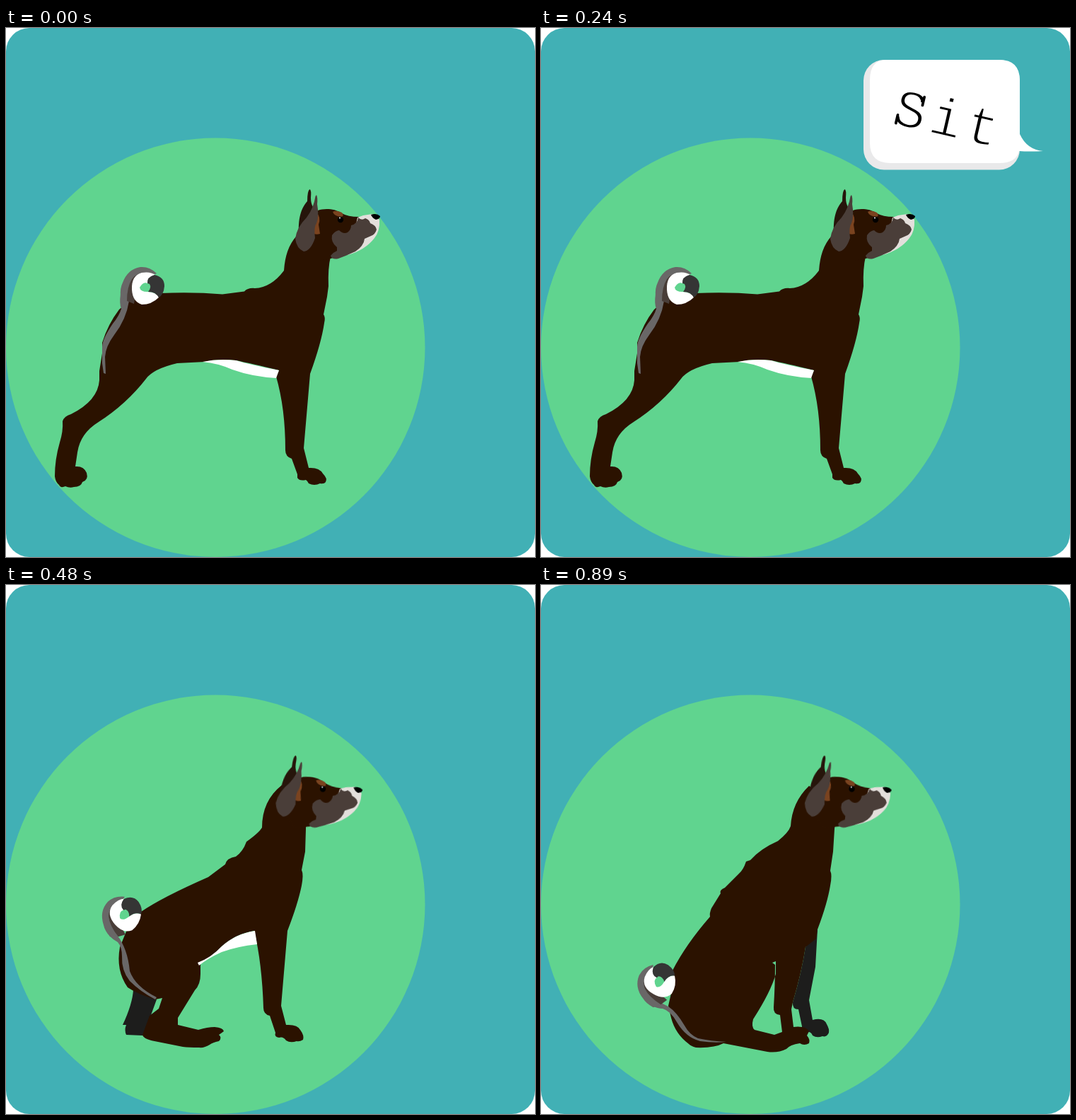
Write an HTML page that moves like this. It is 748 px wide and 748 px high and loops after 1080 ms.

```html
<!DOCTYPE html>
<html lang="en">
<head>
<meta charset="utf-8">
<title>Sit</title>
<style>
  html, body { margin: 0; width: 100%; height: 100%; overflow: hidden; background: #fff; }
  svg { display: block; width: 100%; height: 100%; }
  .coat { fill: #2b1200; fill-rule: evenodd; }
  .far { fill: #1d1d1c; }
  .tail { fill: #696767; }
  .gap { fill: #493d38; }
  .muzzle { fill: #4a3e39; }
  .tan { fill: #7a431f; }
  .white { fill: #fff; }
  .say { font: 76px "Liberation Mono", "Courier New", monospace; letter-spacing: 6.5px; stroke: #fff; stroke-width: 2.4px; }
</style>
</head>
<body>
<svg viewBox="0 0 748 748">
  <defs>
    <g id="head">
      <path fill="#26150b" d="M414 290C413 265 419 253 426 245Q426 230 429.500 228Q432 229 431 240Q431 248 434 253L420 285Z"/>
      <path class="coat" d="M411 300L425 270L441 258C450 255 464 255 475 262Q483 267 499 267L505 285L480 310L466 324L459 326L440 330Z"/>
      <path fill="#e3dfdb" d="M497 268L505 265L518 263L528 271Q529 287 521 297Q508 314 483 321L490 300Z"/>
      <path class="muzzle" d="M498 268Q503 273 508 269Q514 271 515 276Q523 279 524 285Q522 292 516 294L507 298Q506 308 494 316Q481 322 470 326Q461 328 459 322Q463 317 468 315L468 310Q459 303 461 293Q465 287 471 286Q477 292 483 289Q488 285 488 279Q497 277 498 268Z"/>
      <path d="M516 264Q524 261 529 266Q529 270 523 271Q518 269 516 264Z"/>
      <path class="tan" d="M438 260Q446 267 442 278L444 291Q438 293 433 290Z"/>
      <path class="muzzle" d="M439 236Q441 240 440 249Q443 266 439 276Q435 281 437 297Q431 315 421 316Q411 312 409 298Q411 282 425 268Q435 255 437.500 238Z"/>
      <path class="tan" d="M462 260Q467 257 475 261Q479 266 474 267Q464 266 462 260Z"/>
      <circle cx="473" cy="271" r="4.2"/>
      <circle class="white" cx="472" cy="268.5" r="1"/>
    </g>
    <g id="curl">
      <path class="gap" d="M171 386Q169 362 181 349Q195 341 211 348L188 350L181 390Z"/>
      <path class="tail" d="M213 347Q203 337 190 338Q172 341 165 360Q161 368 162 379L171 386Q171 366 178 355Q188 342 211 348Z"/>
      <path class="white" d="M178 370Q177 350 192 346Q204 344 211 349Q201 352 200 361Q194 358 189 367Q190 373 200 373Q212 373 216 381Q206 391 192 391Q179 387 178 370Z"/>
      <path fill="#353535" d="M210 349Q224 352 224 365Q223 377 216 381Q212 373 201 373Q206 367 203 362L200 361Q199 352 210 349Z"/>
    </g>
  </defs>
  <rect width="748" height="748" rx="33" fill="#41b0b5"/>
  <circle cx="296.25" cy="451.75" r="296.25" fill="#60d48f"/>
  <g id="dog"></g>
  <g id="bubble">
    <rect x="456" y="45" width="221" height="155.500" rx="29" fill="#e9e9ea"/>
    <path class="white" d="M488 45H648Q677 45 677 74V150Q687 172 710 174Q690 175 676 174Q672 191 648 191H494Q465 191 465 162V74Q465 45 488 45Z"/>
    <g transform="translate(495 135) rotate(13)">
      <text class="say">Sit</text>
      <path d="M37.500 -47V-35M6.500 -14V-2" stroke="#000" stroke-width="3.8" stroke-linecap="round"/>
    </g>
  </g>
</svg>
<script>
const LOOP = 1080;

// head and curl: [x, y, turn]
const poses = [
  {
    span: [0, 360], head: [430, 228, 0], curl: [201, 368.5, 0],
    coat: `M218 375Q265 373 306 376.500L337 372.500Q342 367 352 368Q375 367 393 343Q395 312 410 295L430 290L459 323
      Q455 340 456 365L454 380L449 405Q452 409 450 417Q446 445 430 489L421 594L428 622Q443 621 448 630
      Q455 637 452 642Q450 645 444 644Q436 648 428 644Q426 640 424 639Q415 641 412 636L412 631L404 609
      Q395 606 395 597Q395 538 382 493L386 484Q345 474 325 470Q300 467 281 472L242 474Q208 482 198 496
      Q170 532 131 557Q105 573 101 600L98 620Q110 619 114 629Q117 639 108 642Q106 649 96 649Q90 651 84 648
      Q77 651 75 646Q70 642 69 634Q69 610 76 586Q81 570 80 556Q82 549 92 546Q130 527 132 498L132 485
      L136 460L136 445Q144 419 160 398L175 385Z`,
    belly: 'M278 472Q300 467 325 470Q345 476 386 484L382 495Q348 493 320 483Q300 474 278 472Z',
    strip: 'M162 376Q160 390 163 397Q160 407 151 418Q136 440 136 451L136 474L138 488L141 489L140 465Q141 450 153 434Q170 412 174 386Z'
  },
  {
    span: [360, 480], head: [428, 230, 4.7], curl: [191.5, 397.5, 0],
    coat: `M211 401Q240 394 297 390L327 380Q331 375 343 375Q355 372 385 343Q386 312 402 293L425 290L452 329
      Q447 335 447 360L446 377L441 403Q444 408 442 415Q440 440 423 484L414 594L420 622Q436 620 441 629
      Q447 636 446 642Q443 645 437 644Q428 648 421 644Q417 638 411 639Q404 638 406 632L397 609
      Q388 606 388 594Q388 540 377 496L376 486Q340 478 318 480Q300 482 285 488Q250 497 233 494
      Q213 508 209 530Q197 580 169 621L184 632Q202 630 207 639Q205 645 202 645Q202 651 194 652
      Q182 660 168 653Q135 635 129 624L143 603L142 600Q153 592 151 551Q142 552 142 540Q139 515 139 490
      Q136 465 141 450L156 425L175 412Z`,
    belly: 'M283 488Q312 478 335 480L377 485L376 497Q345 496 325 491Q300 486 283 488Z',
    strip: 'M152.500 405Q152 420 155 430Q153 440 144 454Q136 470 138 482Q143 512 148 524Q145 505 141 487Q142 470 154 449Q162 436 164 415Z',
    far: `M378 494L386 540L388 565L372 592L370 620Q383 624 385 633L384 643Q381 651 374 650Q362 649 358 639
      Q348 634 349 627L353 599Q347 598 348 585Q368 545 376 500Z`
  },
  {
    span: [480, 600], head: [410, 241, 6.3], curl: [171.5, 465, -38],
    coat: `M191 462Q220 442 286 413L310 395Q312 386 325 384Q335 377 340 363Q358 350 362 343Q362 305 390 283L410 300
      L432 338Q423 338 424 345L423 377L418 403Q421 409 418 425Q413 450 398 489L389 595L396 622
      Q412 621 416 629Q422 637 420 643Q415 646 411 645Q402 648 396 644Q392 638 386 640Q379 639 381 633
      L373 609Q364 607 364 598Q362 535 351 489Q325 493 305 511Q290 527 275 533L275 550Q275 565 267 573
      L243 612L243 622L272 629Q285 625 295 625Q307 626 308 631Q304 634 301 636Q306 640 301 645
      Q292 647 288 650Q280 655 273 654Q258 654 250 653L210 645
      Q194 642 193 636L203 609L216 599L221 584L211 586Q185 578 172 569Q155 545 161 512L170 490Z`,
    belly: 'M271 534Q290 527 305 511Q325 493 352 489L355 508Q327 511 305 519Q285 528 273 538Z',
    strip: 'M146 496Q152 502 158 505Q164 512 164 525Q163 545 175 560Q190 575 211 586L213 583Q183 568 175 546Q172 514 157 495Z',
    far: 'M180 572L213 586L205 608L212 606L193 637L170 636Q167 629 170 622L165 622Q179 592 180 572Z'
  },
  {
    span: [600, LOOP], head: [401.5, 241, 6.3], curl: [170.5, 558.5, -58],
    coat: `M186 545Q205 508 239 469Q238 464 241 457L254 436Q252 431 260 428L280 408Q286 403 290 391L296 389
      Q310 373 335 362Q350 350 353 341Q355 307 379 284L402 300L425 338Q415 336 415 345L413 377L409 404
      Q412 410 409 425Q405 450 391 487L389 500L374 512Q368 550 356 590L354 600L357 625Q374 623 379 631L376 637
      Q381 643 379 648Q372 652 366 648Q352 650 347 656Q335 662 320 660L258 648Q245 655 219 654Q212 652 209 649
      Q190 635 184 612L180 595L188 560ZM327 534L332 532L332 550Q325 575 300 614Q297 625 302 629L330 636L341 632
      L338 608Q328 607 329 597Q331 565 331 537Z`,
    strip: 'M157 595Q165 599 172 599Q183 602 192 618Q205 640 225 645Q245 648 262 646Q240 645 222 641Q210 636 203 623Q192 604 180 596L168 590Z',
    far: `M391 487L388 540L379 587L384 615Q400 611 404 621Q408 628 407 633Q404 640 398 638Q390 641 384 637
      Q382 632 378 632Q367 630 369 624L364 600Q355 600 356 590Q368 550 374 512Z`
  }
];

const path = (kind, d) => d ? `<path class="${kind}" d="${d}"/>` : '';
const part = (id, [x, y, turn], px, py) =>
  `<use href="#${id}" transform="translate(${x} ${y}) rotate(${turn}) translate(${-px} ${-py})"/>`;

const dog = document.getElementById('dog');
dog.innerHTML = poses.map(p => '<g>' +
  path('far', p.far) + path('coat', p.coat) + path('white', p.belly) + path('tail', p.strip) +
  part('curl', p.curl, 201, 368.5) + part('head', p.head, 430, 228) + '</g>').join('');

function show(el, [from, to]) {
  const on = t => t >= from && t < to ? 1 : 0;
  const times = [...new Set([0, from, to, LOOP])].sort((a, b) => a - b);
  el.animate(
    times.map(t => ({ opacity: on(t % LOOP), offset: t / LOOP, easing: 'steps(1, end)' })),
    { duration: LOOP, iterations: Infinity }
  );
}

poses.forEach((p, i) => show(dog.children[i], p.span));
show(document.getElementById('bubble'), [240, 360]);
</script>
</body>
</html>
```
